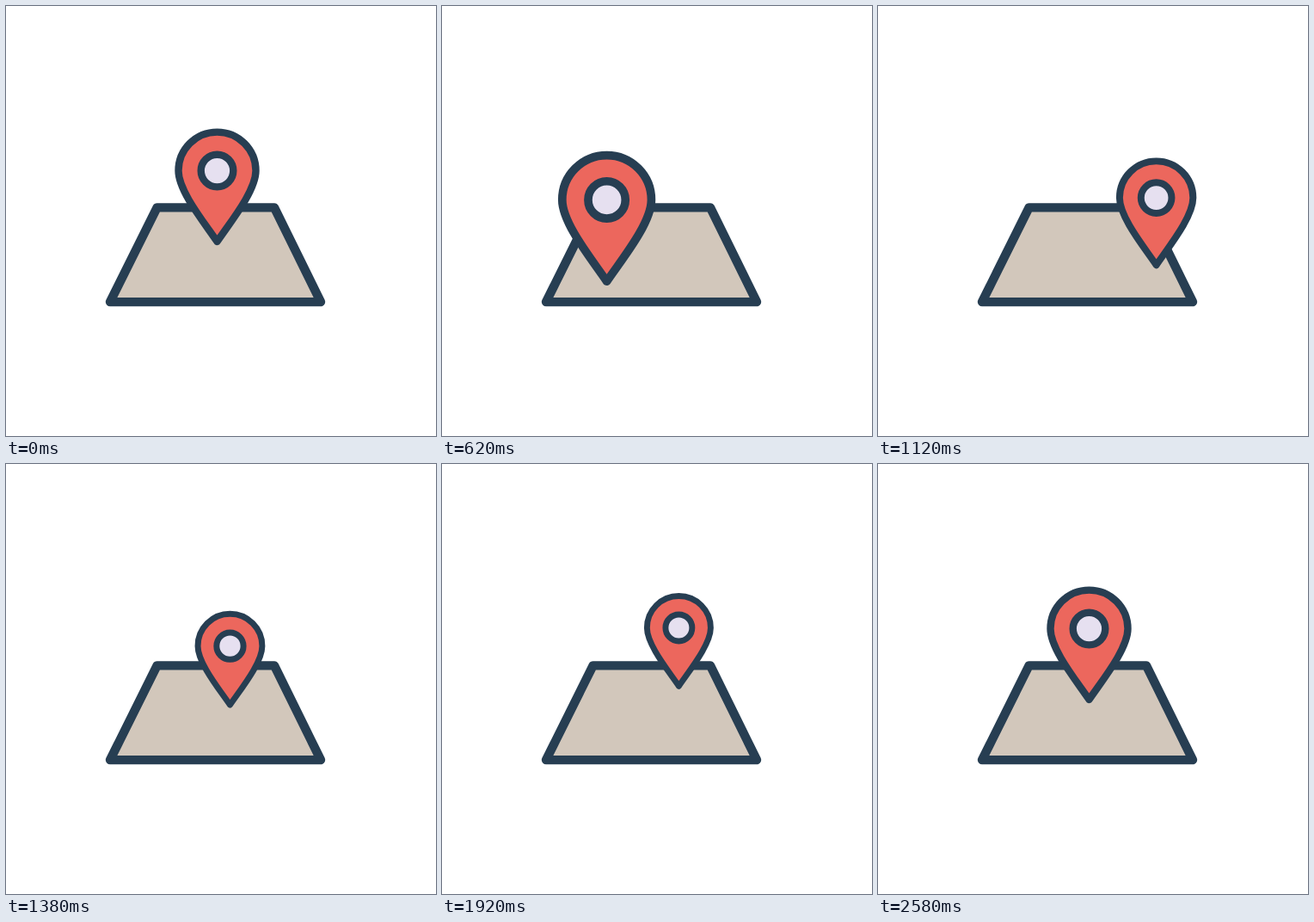
An HTML page that plays this animation: 500x500 px, repeating every 2.6 s.

```html
<!DOCTYPE html>
<html lang="en">
<head>
<meta charset="utf-8">
<title>Map pin</title>
<style>
  html, body { margin: 0; width: 100%; height: 100%; overflow: hidden; background: #fff; }
  svg { display: block; width: 100%; height: 100%; }
</style>
</head>
<body>
<svg viewBox="0 0 500 500">
  <g stroke="#273e52" stroke-linejoin="round">
    <path d="M175.6 234.4H312L366 344.1H121Z" fill="#d2c7bb" stroke-width="10.4"/>
    <g id="pin" stroke-width="8.4">
      <path d="M-45 -18.4A45 45 0 0 1 45 -18.4C45 5.6 14 43.1 0 64C-14 43.1 -45 5.6 -45 -18.4Z" fill="#ec675d"/>
      <circle cy="-18.4" r="18.8" fill="#e6e0f0"/>
    </g>
  </g>
</svg>
<script>
const LOOP = 2600, STEP = 20;
const pin = document.getElementById('pin');

// Each leg of the route: start, end (ms) and the curve travelled.
const legs = [
  [0, 500, 'M245.5 210C220 220 186 235 174.5 243'],
  [500, 1067, 'M174.5 243C182 250.6 316 250.6 326 242'],
  [1067, 1667, 'M326 242C310 230 205 224 205 210.4'],
  [1667, 2083, 'M205 210.4C206 203 300 204 311.8 210'],
  [2083, 2500, 'M311.8 210C302 212.5 265 211 245.5 210']
].map(([from, to, d]) => {
  const path = document.createElementNS('http://www.w3.org/2000/svg', 'path');
  path.setAttribute('d', d);
  return { from, to, path, length: path.getTotalLength() };
});

const sizes = [[0, 1], [500, 1.163], [1667, 0.772], [2500, 1]];

const ease = (t, from, to) => {
  const p = Math.min(1, Math.max(0, (t - from) / (to - from)));
  return p * p * (3 - 2 * p);
};

function place(t) {
  const leg = legs.find(l => t < l.to) || legs[legs.length - 1];
  return leg.path.getPointAtLength(leg.length * ease(t, leg.from, leg.to));
}

function size(t) {
  let value = sizes[0][1];
  for (let i = 1; i < sizes.length; i++) {
    const [from, a] = sizes[i - 1], [to, b] = sizes[i];
    value += (b - a) * ease(t, from, to);
  }
  return value;
}

function draw(now) {
  const t = Math.floor((now % LOOP) / STEP) * STEP;
  const { x, y } = place(t);
  pin.setAttribute('transform', `translate(${x} ${y}) scale(${size(t)})`);
}

function tick() {
  draw(performance.now());
  requestAnimationFrame(tick);
}

draw(0);
requestAnimationFrame(tick);
</script>
</body>
</html>
```
